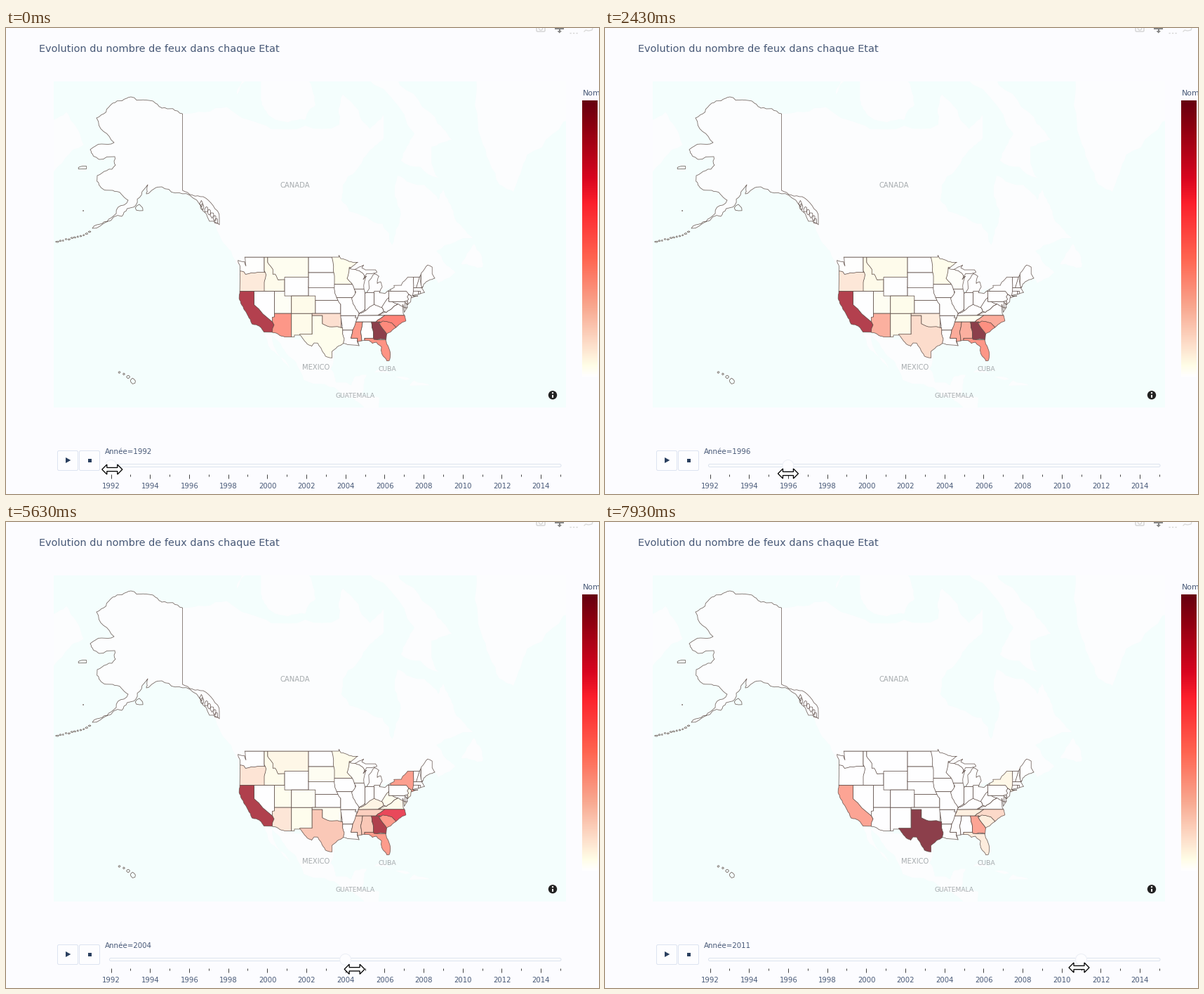
Recreate the animation shown at these times as a matplotlib script. Size 845 by 663 pixels, loop 8 s.

```python
import numpy as np
import matplotlib.pyplot as plt
from matplotlib.animation import FuncAnimation
from matplotlib.collections import LineCollection, PolyCollection
from matplotlib.colors import LinearSegmentedColormap
from matplotlib.patches import Circle, FancyBboxPatch, Polygon, Rectangle

W, H, DPI = 845, 663, 64
FRAMES, STEP = 200, 40
PX = 72 / DPI  # points per pixel
INK, TEXT, EDGE = "#2a3f5f", "#485977", "#5d4c46"
rng = np.random.default_rng(4)

plt.rcParams["font.family"] = "DejaVu Sans"
fig = plt.figure(figsize=(W / DPI, H / DPI), dpi=DPI, facecolor="#fcfcff")
ax = fig.add_axes([0, 0, 1, 1])
ax.axis("off")


def pixels(*nums):
    return np.reshape(nums, (-1, 2)).astype(float)


def mercator(*nums):
    """Flat west-longitude, latitude pairs to stage pixels."""
    lon, lat = pixels(*nums).T
    m = np.degrees(np.log(np.tan(np.pi / 4 + np.radians(lat) / 2)))
    return np.column_stack([251.5 + (141 - lon) * 4.86, 326 + (56.37 - m) * 4.86])


def split(a, b, amount, depth):
    """Midpoint displacement; a shared border bends the same from both sides."""
    lo, hi = sorted([tuple(a), tuple(b)])
    d = np.subtract(hi, lo)
    if depth == 0 or np.abs(d).min() < 0.5:
        return [a]
    seed = int(10 * (13 * (lo[0] + hi[0]) + 7 * (lo[1] + hi[1])))
    shift = np.random.default_rng(seed).uniform(-amount, amount)
    mid = (a + b) / 2 + shift * np.array([-d[1], d[0]])
    return split(a, mid, amount, depth - 1) + split(mid, b, amount, depth - 1)


def rough(p, amount=0.12, depth=3):
    return np.array(sum((split(a, b, amount, depth) for a, b in zip(p, np.roll(p, -1, 0))), []))


def text(x, y, s, size, color=TEXT, ha="left", **kw):
    return ax.text(x, y, s, fontsize=size * PX, color=color, ha=ha,
                   va="center_baseline", **kw)


# Coasts
alaska = rough(pixels(
    251.5, 122, 222, 114, 213, 107, 178, 98, 152, 107, 129, 128, 154, 163, 120, 173,
    133, 187, 155, 183, 156, 195, 130, 210, 134, 225, 152, 231, 174, 245, 150, 270,
    123, 285, 165, 268, 185, 252, 202, 223, 200, 236, 222, 226, 262, 238, 290, 275,
    304, 280, 304, 270, 281, 240, 251.5, 231), 0.16)
lakes = mercator(
    95.15, 49, 95.1, 49.35, 94.6, 48.7, 89.6, 48, 92.1, 46.75, 90.4, 46.6, 87.9, 47.45,
    88.4, 46.9, 87.4, 46.5, 84.4, 46.5, 84, 46, 87, 45.75, 88, 44.55, 87.1, 45.2,
    87.8, 42.5, 87.3, 41.6, 86.25, 42.6, 86.4, 44.2, 84.75, 45.75, 83.4, 45.2, 83.9, 43.7,
    82.9, 44.05, 82.45, 43, 83.3, 41.7, 81.7, 41.5, 78.9, 42.85, 79, 43.27, 76.8, 43.3,
    76.2, 44.1, 75, 45, 71.5, 45)
atlantic = mercator(
    70, 46.7, 69.2, 47.45, 67.8, 47.05, 67.8, 45.7, 67, 44.8, 70.2, 43.6, 70.8, 42.6,
    70, 41.75, 71.2, 41.5, 73.6, 41, 72, 41, 74, 40.55, 74.1, 39.7, 75, 39, 75.5, 39.5,
    75.05, 38.4, 76, 37.3, 76.4, 39.1, 76.3, 37, 75.5, 35.25, 77.6, 34.3, 79.2, 33.2,
    81.1, 32.1, 81.4, 30.5, 80.05, 26.8, 80.4, 25.2)
gulf = mercator(
    81.1, 25.15, 82.8, 27.9, 82.65, 28.8, 84.2, 30, 85.3, 29.7, 86.3, 30.4, 89.6, 30.2,
    89.2, 29.1, 91.3, 29.3, 93.8, 29.7, 97.2, 27.6, 97.15, 25.95, 99.1, 26.4, 100.3, 28.3,
    101.4, 29.77, 102.4, 29.8, 103.1, 28.98, 104.5, 29.6, 106.5, 31.78, 108.2, 31.78,
    108.2, 31.33, 111.07, 31.33, 114.8, 32.5, 117.1, 32.53)
pacific = mercator(
    118.5, 34, 120.6, 34.5, 121.9, 36.6, 123.8, 39.2, 124.4, 40.4, 124.2, 42, 124.1, 46,
    124.7, 48.4, 122.8, 48.1, 122.4, 47.3, 122.75, 49)
country = rough(np.vstack([lakes, atlantic, gulf, pacific]), 0.08)

# Base map
view = Rectangle((68, 76), 730, 464, fc="#f4fefd", ec="none", zorder=0)
ax.add_patch(view)


def land(p):
    patch = Polygon(p, fc="#fcfdfe", ec="none", zorder=1)
    ax.add_patch(patch)
    patch.set_clip_path(view)
    return patch


land(alaska)
frontier = land(country)
for shore in (
    # mainland north, then south
    (141, 69.6, 128, 70.3, 115, 68, 95, 68.5, 94, 71.5, 86, 68, 82, 69.5, 82, 67, 87, 65,
     94, 61, 94.5, 58.8, 92, 57, 82.3, 55, 79.5, 51.3, 77, 56.5, 78, 62.3, 70, 61,
     66, 58.8, 64.5, 60.3, 61.5, 56.5, 55.8, 52.5, 66.5, 50.2, 65, 49, 61, 46, 66, 43.7,
     67, 44.8, 83, 42, 124, 47, 128, 51, 135, 58.2, 141, 60),
    (97, 32, 97.6, 23, 96, 19.3, 91.5, 18.5, 90.3, 21, 87, 21.4, 88.5, 15.8, 83.3, 15,
     83.5, 11.5, 87, 11.5, 94, 16, 105.5, 20, 109, 25.8, 114.7, 31.7, 109.5, 23, 115, 28,
     117.1, 32.5),
    # islands
    (118, 71, 115, 69.3, 105, 69, 102, 70.5, 105, 73.5, 118, 73.5),
    (125, 71.5, 123, 73.5, 120, 73.5),
    (90, 73.5, 73, 67.5, 77, 64.3, 66, 62, 68, 66, 62, 66.8, 67, 69.3, 80, 73.5),
    (56, 73.5, 53.5, 67, 48, 61, 44, 60, 40, 65, 25, 69.5, 20, 73.5),
    (59.3, 47.6, 55.5, 51.5, 53, 47),
    (84.9, 21.9, 82, 23.1, 74.2, 20.2),
    (74.4, 18.4, 73, 19.9, 68.5, 18.5),
    (180, 69, 175, 69.8, 170, 66.2, 180, 62.5),
):
    land(rough(mercator(*shore)))

# States: painted in order, each covering the last, trimmed by the coastline
shapes = {}


def poly(name, *nums):
    shapes[name] = rough(mercator(*nums), 0.08, 2)


def box(name, w, e, s, n):
    poly(name, w, n, e, n, e, s, w, s)


box("WA", 125, 117.03, 45.6, 49)
poly("OR", 125, 46.3, 123, 46.1, 122.5, 45.6, 119, 46, 116, 46, 116, 42, 125, 42)
box("MT", 116.05, 104.05, 44.45, 49)
poly("ID", 117.03, 49, 116.05, 49, 116.05, 48, 114.5, 46.6, 114.5, 45.6, 113.9, 45.65,
     113, 44.45, 111.05, 44.5, 111.05, 42, 117.03, 42, 117.03, 43.9, 116.5, 45.5, 117.03, 46.4)
box("NV", 120, 114.04, 35, 42)
box("UT", 114.04, 109.05, 37, 42)
box("WY", 111.05, 104.05, 41, 45)
poly("CA", 125, 42, 120, 42, 120, 39, 114.63, 35, 114.15, 34.3, 114.7, 32, 125, 32)
poly("AZ", 114.04, 37, 109.05, 37, 109.05, 31, 114.8, 31, 114.7, 32.7, 114.15, 34.3,
     114.63, 35, 114.7, 36.1, 114.04, 36.2)
box("NM", 109.05, 103, 31, 37)
box("ND", 104.05, 96, 45.94, 49)
box("NE", 104.05, 95, 40, 43)
box("SD", 104.05, 96, 42.8, 45.94)
box("KS", 102.05, 94.62, 37, 40)
box("CO", 109.05, 102.05, 37, 41)
poly("OK", 103, 37, 94.5, 37, 94.5, 33, 100, 33, 100, 36.5, 103, 36.5)
poly("AR", 94.62, 36.5, 89.5, 36.5, 91.15, 33, 94.2, 33, 94.43, 35.4)
poly("LA", 94.04, 33, 91.1, 33, 91.6, 31, 89.7, 31, 89, 28.5, 94.5, 28.5)
poly("TX", 103, 36.5, 100, 36.5, 100, 34.56, 97.2, 33.8, 94.04, 33.55, 94.04, 32,
     93.6, 31, 93.8, 29, 97, 25, 107, 29, 106.62, 32, 103, 32)
poly("MN", 97.2, 49.5, 89, 49.5, 89, 47, 91, 43.5, 96.45, 43.5, 96.45, 45.3, 97.2, 49)
poly("IA", 96.45, 43.5, 90, 43.5, 90, 40.6, 95.8, 40.6, 96.5, 42.5)
poly("MO", 95.8, 40.6, 89, 40.6, 89.2, 36, 90.4, 36, 90.1, 36.5, 94.62, 36.5, 94.62, 39.1)
box("MI", 90.4, 82, 41.74, 47.5)
poly("WI", 92.1, 47, 90.4, 46.6, 88.1, 45.8, 87.6, 45.1, 86.9, 44, 86.9, 42.5,
     90.65, 42.5, 91.2, 43.5, 92.75, 44.75, 92.2, 46.1)
box("IN", 87.52, 84.8, 37.5, 41.74)
poly("IL", 90.65, 42.5, 87.5, 42.5, 87.52, 38, 89.2, 37, 90.2, 38.1, 91.4, 40.4, 90.2, 41.8)
box("OH", 84.8, 80.52, 38, 42)
box("PA", 80.52, 74.6, 39.72, 42)
box("ME", 71.1, 66.5, 42.9, 47.6)
poly("NH", 71.5, 45.2, 71.1, 45.3, 70.8, 42.87, 72.46, 42.73)
poly("VT", 73.35, 45, 71.5, 45, 72.46, 42.73, 73.27, 42.75)
box("MA", 73.5, 69.5, 41.2, 42.75)
box("RI", 71.8, 71.2, 41, 42.02)
box("CT", 73.5, 71.8, 41, 42.05)
poly("NY", 80, 42, 75.35, 42, 74.7, 41.36, 73.9, 41, 74.2, 40.3, 71.8, 40.8, 73.5, 41.1,
     73.3, 45.1, 80, 45.1)
poly("NJ", 74.7, 41.36, 73.9, 41, 73.5, 39, 75.2, 38.8, 75.4, 39.7, 74.75, 40.2, 75.1, 40.8)
box("MD", 79.48, 75, 38, 39.72)
box("DE", 75.79, 75, 38.45, 39.8)
poly("WV", 82.6, 38.4, 80.52, 40.64, 80.52, 39.72, 79.48, 39.72, 77.8, 39.2, 79.3, 38.4,
     81.2, 37.25, 82, 37.5)
poly("KY", 89.5, 36.5, 89.15, 37, 87.1, 37.8, 84.8, 39.1, 82.6, 38.4, 82, 37.5, 83.7, 36.55)
poly("VA", 83.7, 36.55, 81.2, 37.25, 79.3, 38.4, 77.8, 39.2, 77, 38.8, 75.2, 37.9, 75.2, 36.55)
poly("TN", 89.5, 36.5, 81.68, 36.55, 84.3, 35, 90.2, 35)
poly("NC", 84.3, 35, 81.68, 36.55, 75, 36.55, 75, 33.5, 78.4, 33.7, 80, 34.8, 83, 35)
poly("MS", 90.2, 35, 88.2, 35, 88.4, 30, 89.7, 30, 89.7, 31, 91.6, 31, 91.1, 33)
poly("AL", 88.2, 35, 85.6, 35, 85, 32.3, 85, 31, 87.6, 31, 87.6, 30, 88.4, 30)
poly("GA", 85.6, 35, 83.1, 35, 83.35, 34.7, 81, 31.9, 81, 30.6, 85, 30.7, 85, 32.3)
poly("SC", 83.35, 34.7, 82.3, 35.2, 81.05, 35.1, 79.67, 34.8, 78.4, 33.7, 81, 31.9)
poly("FL", 87.6, 31, 85, 31, 84.9, 30.7, 79.5, 30.6, 79.5, 24.5, 87.6, 24.5)

fills = PolyCollection(list(shapes.values()), edgecolors=EDGE, linewidths=0.75 * PX, zorder=2)
fills.set_snap(False)
ax.add_collection(fills)
fills.set_clip_path(frontier)

# Coast outlines and small islands
outlines = [np.vstack([p, p[:1]]) for p in (alaska, country)]


def islet(x, y, rx, ry):
    a = np.linspace(0, 2 * np.pi, 9)
    r = rng.uniform(0.65, 1.2, 9)
    r[-1] = r[0]
    outlines.append(np.column_stack([x + rx * r * np.cos(a), y + ry * r * np.sin(a)]))


for k in np.linspace(0, 1, 12):
    islet(119 - 46 * k, 289 + 15 * k ** 0.6 + rng.uniform(-1, 1), rng.uniform(0.8, 2.6), 1)
for k in np.linspace(0, 1, 7):
    islet(277 + 22 * k + rng.uniform(-2, 2), 250 + 25 * k, 2.4, 4)
for k in np.linspace(0, 1, 4):  # growing chain in the south-west
    islet(161.5 + 19 * k, 490 + 12 * k ** 1.5, 1.3 + 2.8 * k ** 3, 1.2 + 2.6 * k ** 3)
islet(109, 198.5, 7, 2.6)
islet(190, 256, 6, 4.5)
islet(110, 260, 0.6, 0.6)
coastline = LineCollection(outlines, colors=EDGE, linewidths=0.8 * PX, alpha=0.85, zorder=3)
coastline.set_snap(False)
ax.add_collection(coastline)

for x, y, s, size in ((412, 223, "CANADA", 10), (441.5, 481.5, "MEXICO", 10),
                      (543.5, 485, "CUBA", 9.2), (497.5, 523, "GUATEMALA", 9.1)):
    text(x, y, s, size, "#a6abae", "center", zorder=4)
ax.add_patch(Circle((779, 522.3), 6.2, fc="#222222", ec="none", zorder=4))
ax.add_patch(Rectangle((778, 521.5), 2, 4.5, fc="white", zorder=5))
ax.add_patch(Circle((779, 519.2), 1.2, fc="white", zorder=5))

# Colour scale
stops = ((0, "#ffffff"), (0.04, "#fffde6"), (0.12, "#fddcc8"), (0.25, "#f8a890"),
         (0.43, "#ff6450"), (0.63, "#fb1f2b"), (0.72, "#d8051f"), (0.92, "#87000f"),
         (1, "#67000f"))
heat = LinearSegmentedColormap.from_list("heat", stops, N=512)
ax.imshow(np.linspace(1, 0, 400)[:, None], cmap=heat, extent=(821, 843, 496, 103),
          aspect="auto", zorder=2)
bar_title = text(821.5, 92, "Nombre", 11)
bar_title.set_clip_path(Rectangle((815, 80), 28.5, 24, transform=ax.transData))

text(47, 28.5, "Evolution du nombre de feux dans chaque Etat", 14.45)

# Tool icons cut by the top edge
ax.add_patch(FancyBboxPatch((756, -4), 12, 9, boxstyle="round,pad=0,rounding_size=1.5",
                            fc="none", ec="#d4d4d4", lw=1.4 * PX))
ax.add_patch(Circle((762, 0.5), 2.6, fc="none", ec="#d4d4d4", lw=1.2 * PX))
ax.add_patch(Rectangle((782, 0), 13, 2, fc="#858585"))
ax.add_patch(Rectangle((787.7, 0), 2, 5, fc="#858585"))
ax.add_patch(Polygon(pixels(785.5, 4, 792, 4, 788.7, 7.5), fc="#858585"))
ax.plot([803, 816], [6.5, 6.5], color="#d4d4d4", lw=1.4 * PX, ls=(0, (1.6, 1.6)))
ax.plot([824, 826, 830, 835, 836], [5, 3, 4, 3, 0], color="#d9d9d9", lw=1.3 * PX)

# Controls
for x in (73.5, 104.5):
    ax.add_patch(FancyBboxPatch((x, 601.5), 29, 28, boxstyle="round,pad=0,rounding_size=2",
                                fc="#fdfdff", ec="#dde4f1", lw=PX))
ax.add_patch(Polygon(pixels(85, 611, 92.3, 615, 85, 619), fc=INK))
ax.add_patch(Rectangle((116.5, 612.5), 5.2, 5.2, fc=INK))

X0, GAP, FIRST, LAST = 149.6, 27.84, 1992, 2015
ax.add_patch(FancyBboxPatch((147.5, 620.5), 643.5, 4, boxstyle="round,pad=0,rounding_size=2",
                            fc="#fcfdff", ec="#dde4ee", lw=PX, zorder=2))
for year in range(FIRST, LAST + 1):
    x = X0 + GAP * (year - FIRST)
    even = year % 2 == 0
    ax.plot([x, x], [635, 641 if even else 638], color="#444444", lw=PX, zorder=2,
            solid_capstyle="butt")
    if even:
        text(x + 0.4, 651, str(year), 10.1, ha="center")

label = text(141, 602.5, "", 10.2)
knob = Circle((X0, 622.5), 8, fc="#fdfdff", ec="#eceff6", lw=PX, zorder=3)
ax.add_patch(knob)
arrow = pixels(-14.5, 0, -7.5, -7, -7.5, -2.6, 7.5, -2.6, 7.5, -7)
arrow = np.vstack([arrow, -arrow])
pointer = Polygon(arrow, fc="white", ec="black", lw=1.3 * PX, zorder=6)
ax.add_patch(pointer)

# Share of the yearly maximum: key years for the states that swing most
KEYS = (1992, 1994, 1996, 1999, 2001, 2007, 2011)
swings = dict(
    CA=(.87, 1, .87, .75, .76, 1, .34),
    GA=(1, .7, 1, 1, 1, .77, .34),
    NC=(.46, .56, .31, .25, .72, .67, .16),
    TX=(.04, 0, .15, .05, 0, .43, 1),
    NY=(0, 0, 0, 0, .19, .53, .06),
    AL=(0, .29, .3, .31, .2, .23, 0),
)
# The rest: level in 1992, level in 2007, extra in the dry year 1994
trends = dict(
    FL=(.4, .36, 0), SC=(.43, .36, 0), MS=(.38, .14, 0), AZ=(.38, .05, .08),
    OR=(.09, .13, .18), ID=(.03, .05, .23), MT=(.02, .07, .18), WA=(0, 0, .08),
    CO=(.04, .02, .12), NM=(.04, .04, .11), UT=(.02, .04, .03), OK=(.14, 0, 0),
    MN=(.04, .05, .03), WI=(0, .02, .08), MO=(0, 0, .05), TN=(-.05, .25, 0),
    KY=(-.05, .1, 0), VA=(-.05, .07, 0), WV=(-.03, .05, 0), NJ=(-.1, .1, 0),
    SD=(-.02, .04, 0),
)


def level(name, year):
    if name in swings:
        return np.interp(year, KEYS, swings[name])
    start, end, dry = trends.get(name, (0, 0, 0))
    v = start + (end - start) * (year - 1992) / 15 + dry * np.exp(-(year - 1994) ** 2 / 1.5)
    fade = np.clip((year - 2007) / 4, 0, 1)
    return max(0, v * (1 - 0.5 * fade) - 0.08 * fade)


def palette(year):
    base = np.array([0.992, 0.992, 1])
    return [0.75 * np.array(heat(float(level(s, year)))[:3]) + 0.25 * base for s in shapes]


palettes = {y: palette(y) for y in range(FIRST, LAST + 1)}
TIMES = (0, 1470, 2430, 3730, 4670, 6570, 7930)
PATH_X = (150.5, 208.5, 261.5, 357, 414.3, 579, 675.5)
PATH_Y = (628, 633, 634, 636.5, 637, 635.5, 634)


def draw(i):
    t = (i + 0.5) * STEP
    x, y = np.interp(t, TIMES, PATH_X), np.interp(t, TIMES, PATH_Y)
    n = round((x - X0 - 1.5) / GAP)
    pointer.set_xy(arrow + [x, y])
    knob.center = (X0 + GAP * n, 622.5)
    label.set_text(f"Année={FIRST + n}")
    fills.set_facecolor(palettes[FIRST + n])
    return fills, knob, label, pointer


ax.set_xlim(0, W)
ax.set_ylim(H, 0)
anim = FuncAnimation(fig, draw, frames=FRAMES, interval=STEP, repeat=True, repeat_delay=0)
plt.show()
```
